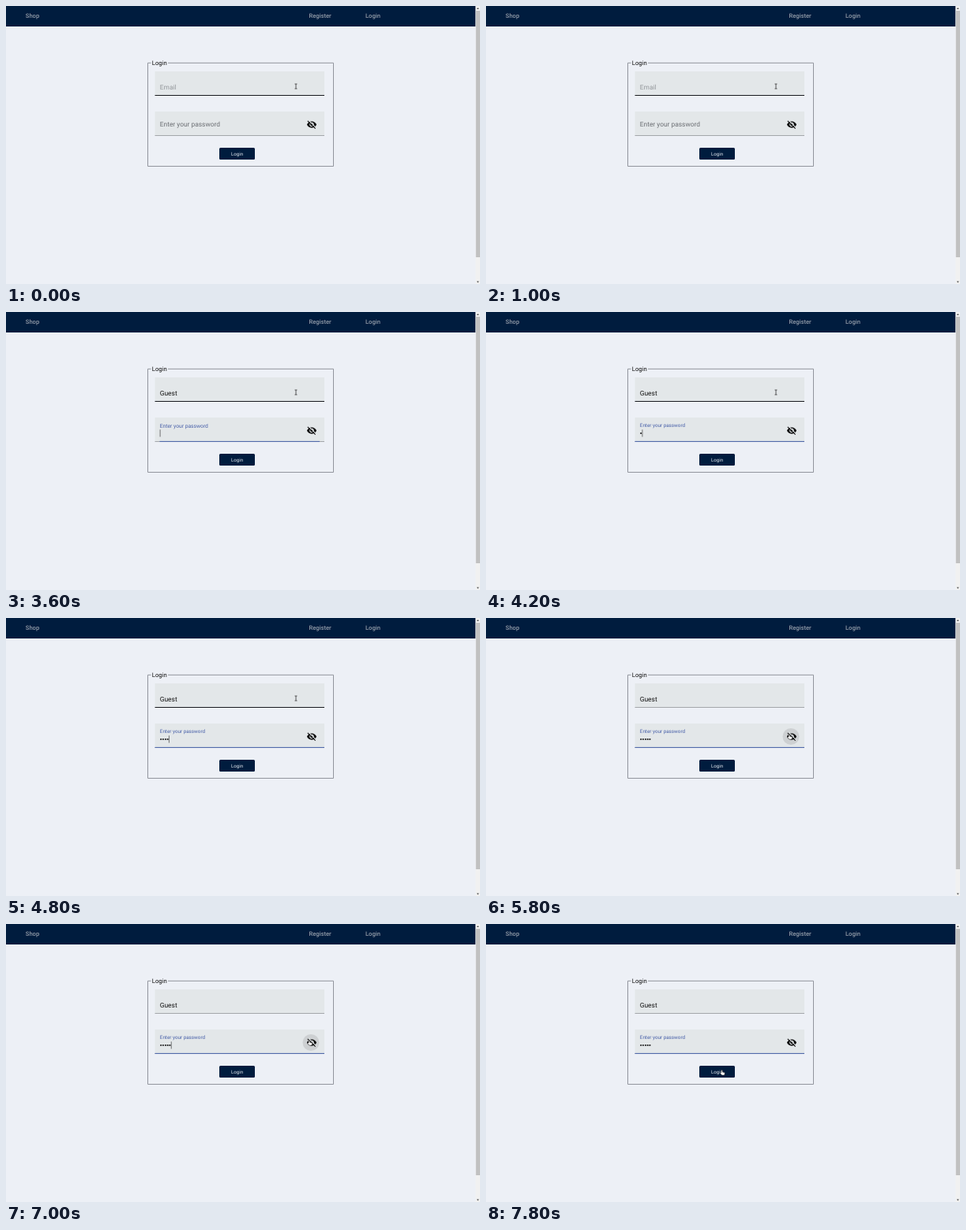
Write an HTML page that moves like this. It is 600 px wide and 353 px high and loops after 8 s.

```html
<!DOCTYPE html>
<html lang="en">
<head>
<meta charset="utf-8">
<title>Login form</title>
<style>
  html, body { margin: 0; height: 100%; overflow: hidden; background: #edf0f6; }
  svg {
    display: block; width: 100vw; height: 100vh;
    font: 8.4px Roboto, sans-serif; text-rendering: geometricPrecision;
  }
  .nav { font-size: 7.6px; font-weight: 500; fill: #929ba8; }
  .button { font-size: 6.1px; fill: #e4e8ee; }
  .field { fill: #e3e7e9; }
  .cursor { stroke-width: .5; stroke: #111; fill: #fff; }
</style>
</head>
<body>
<svg viewBox="0 0 600 353">
  <rect width="600" height="353" fill="#edf0f6"/>
  <rect width="594.5" height="26" fill="#001c3e"/>
  <g class="nav">
    <text x="24.8" y="15.4">Shop</text>
    <text x="383.5" y="15.4">Register</text>
    <text x="455" y="15.4">Login</text>
  </g>

  <rect x="594.5" width="5.5" height="353" fill="#f1f1f1"/>
  <rect x="594.8" y="6" width="5.2" height="313" fill="#c1c1c1"/>
  <path d="M595.8 4l1.5-2 1.5 2zM595.8 349.5l1.5 2 1.5-2z" fill="#555"/>

  <path d="M183.5 72.3H179.5V203.5H414.5V72.3H205" fill="none" stroke="#92959d"/>
  <text x="184.8" y="74.9" font-size="7.7" fill="#111">Login</text>

  <rect class="field" x="188.5" y="83" width="214.5" height="31"/>
  <path id="emailLine" d="M188.5 113.5H403"/>
  <text id="email" x="194.8" y="106"></text>

  <rect class="field" x="188.5" y="134" width="214.5" height="31"/>
  <path d="M188.5 164.5H403" stroke="#a3a6aa"/>
  <path id="focusLine" stroke="#4862ab"/>
  <text id="label" x="194.8">Enter your password</text>
  <text id="password" x="194.8" y="157" fill="#111" stroke="#111"></text>
  <path id="caret" stroke="#222" stroke-width=".6"/>

  <circle id="halo" cx="386" cy="150.5" r="10.5" fill="#cdd0d2"/>
  <g transform="translate(380.4 143.9) scale(.55)">
    <path d="M12 4.5C7 4.5 2.7 7.6 1 12c1.7 4.4 6 7.5 11 7.5s9.3-3.1 11-7.5c-1.7-4.4-6-7.5-11-7.5z" fill="#080808"/>
    <circle cx="12" cy="12" r="4" fill="#080808" stroke="#e3e7e9" stroke-width="2"/>
    <g id="slash" stroke-width="1.9">
      <path d="M4.5 2.2L22.2 19.9" stroke="#e3e7e9"/>
      <path d="M2.6 3.6L20.4 21.4" stroke="#080808"/>
    </g>
  </g>

  <rect x="270" y="180" width="45" height="15" rx="1.5" fill="#001c3e"/>
  <text class="button" x="285" y="189.8">Login</text>

  <g id="mouse">
    <path id="beam" d="M-1.5-3h3M0-3v6M-1.5 3h3" stroke="#333" stroke-width=".8"/>
    <path id="arrow" class="cursor" d="M0 0v7l1.7-1.6 1.1 2.5 1-.5-1.1-2.4h2.2z"/>
    <path id="hand" class="cursor" d="M-.7 3.4V.5a.7.7 0 0 1 1.4 0V2.5l2.6.6q.6.2.5 1L3.3 6.500H.1L-2.1 4.1q.2-1 1.4-.7z"/>
  </g>
</svg>
<script>
const $ = id => document.getElementById(id);
const LOOP = 8000, STEP = 200;
const USER = "Guest";
const FOCUS = 3480, REVEAL = 6000, CONCEAL = 7000;

const clamp = v => Math.min(1, Math.max(0, v));
const progress = (t, start, duration) => clamp((t - start) / duration);
const mix = (a, b, p) => a + (b - a) * p;
const show = (id, visible) => $(id).style.display = visible ? "" : "none";
const set = (id, attributes) => {
  for (const name in attributes) $(id).setAttribute(name, attributes[name]);
};
const typedCount = (t, start) =>
  Math.min(USER.length, Math.max(0, Math.floor((t - start) / STEP) + 1));

function drawEmail(t, hovered) {
  const typed = USER.slice(0, typedCount(t, 2400));
  $("email").textContent = typed || "Email";
  set("email", { fill: typed ? "#111" : "#93979b" });
  const editing = t >= 2200 && t < FOCUS;
  set("emailLine", { stroke: editing ? "#343b6c" : hovered ? "#17191e" : "#a3a6aa" });
  return typed;
}

function drawPassword(t) {
  const typed = USER.slice(0, typedCount(t, 4200));
  const revealed = t >= REVEAL && t < CONCEAL;
  $("password").textContent = revealed ? typed : "•".repeat(typed.length);
  set("password", { "stroke-width": revealed ? 0 : .3 });
  show("slash", !revealed);

  const p = progress(t, FOCUS, 150);
  set("label", {
    y: mix(152.7, 145.7, p),
    "font-size": mix(8.4, 6.3, p),
    fill: p ? "#4860a9" : "#6b6e73"
  });
  const half = 107.25 * clamp(p * 1.18);
  set("focusLine", { d: `M${295.75 - half} 164.4H${295.75 + half}` });
  show("focusLine", p > 0);
  return typed;
}

function drawCaret(t, email, password) {
  const onPassword = t >= FOCUS;
  const lastInput = [CONCEAL, REVEAL, 5000, FOCUS, 3200].find(time => t >= time) ?? 1400;
  const typing = (t >= 2400 && t <= 3200) || (t >= 4200 && t <= 5000);
  const phase = ((t - lastInput) % 1000 + 1000) % 1000;
  const hasText = onPassword ? password : email;
  const width = hasText ? $(onPassword ? "password" : "email").getComputedTextLength() : 0;
  const x = 195.1 + width, y = onPassword ? 149.3 : 98.3;
  set("caret", { d: `M${x} ${y}v9.2` });
  show("caret", typing || phase < 500);
}

function mousePosition(t) {
  const toEye = progress(t, 5200, 400), toButton = progress(t, 7200, 400);
  return [
    mix(mix(367, 383.7, toEye), 298.5, toButton),
    mix(mix(102, 147.6, toEye), 185.5, toButton)
  ];
}

function draw(t) {
  const [x, y] = mousePosition(t);
  const inRows = (top, bottom) => y > top && y < bottom;
  const overEmail = inRows(83, 114);
  const overEye = Math.hypot(x - 386, y - 150.5) < 10;
  const overButton = x < 315 && inRows(180, 196);
  const overHand = overEye || overButton;
  const overText = !overHand && (overEmail || inRows(134, 165));

  const email = drawEmail(t, overEmail);
  const password = drawPassword(t);
  drawCaret(t, email, password);
  show("halo", overEye);
  show("beam", overText);
  show("hand", overHand);
  show("arrow", !overText && !overHand);
  set("mouse", { transform: `translate(${x} ${y})` });
}

const begin = performance.now();
function tick() {
  const t = (performance.now() - begin) % LOOP;
  draw(Math.floor(t / STEP) * STEP);
  requestAnimationFrame(tick);
}
tick();
</script>
</body>
</html>
```
